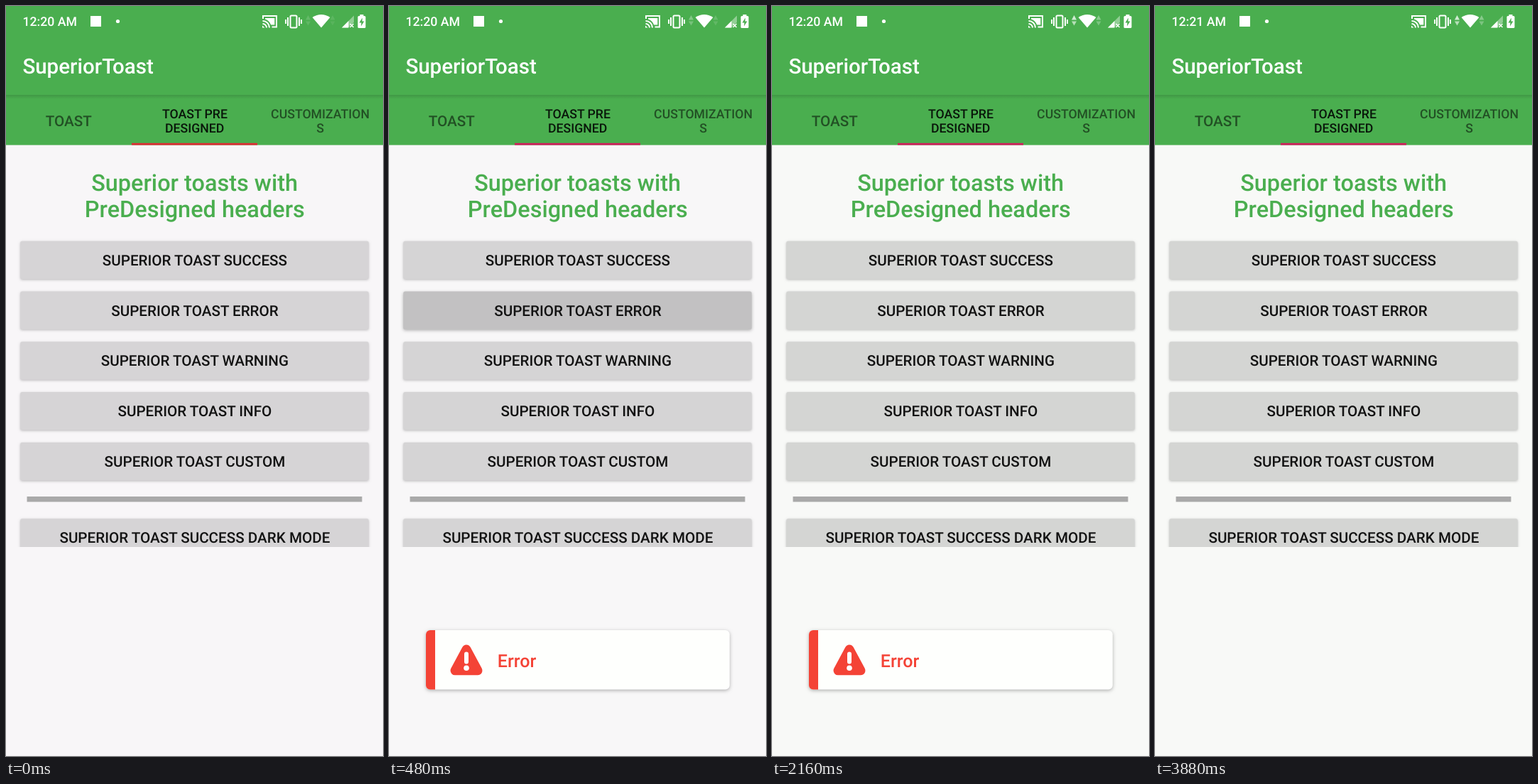
These frames come from a looping animation (531 px wide and 1055 px high, 3.92 s). An HTML page with a canvas:

```html
<!DOCTYPE html>
<html lang="en">
<head>
<meta charset="utf-8">
<title>SuperiorToast</title>
<style>
  html, body { margin: 0; width: 100%; height: 100%; overflow: hidden; background: #f8f9f7; }
  canvas { display: block; width: 531px; height: 1055px; }
</style>
</head>
<body>
<canvas id="stage"></canvas>
<script>
const W = 531, H = 1055, LOOP = 3920;
const GREEN = '#4aae4f', RED = '#f44336', INK = '#121212';
const canvas = document.getElementById('stage');
const ctx = canvas.getContext('2d');
const dpr = window.devicePixelRatio || 1;
canvas.width = Math.round(W * dpr);
canvas.height = Math.round(H * dpr);
ctx.textRendering = 'geometricPrecision';

const ramp = (t, from, to) => Math.min(1, Math.max(0, (t - from) / (to - from)));
const mix = (a, b, k) => a + (b - a) * k;
const blend = (a, b, k) => `rgb(${a.map((v, i) => Math.round(mix(v, b[i], k))).join(',')})`;
const white = a => `rgba(255,255,255,${a})`;
const black = a => `rgba(0,0,0,${a})`;

function scoped(draw) {
  ctx.save();
  draw();
  ctx.restore();
}

function rect(x, y, w, h, color) {
  ctx.fillStyle = color;
  ctx.fillRect(x, y, w, h);
}

function trace(x, y, w, h, r) {
  ctx.beginPath();
  ctx.roundRect(x, y, w, h, r);
}

function poly(points, color) {
  ctx.beginPath();
  points.forEach(([x, y]) => ctx.lineTo(x, y));
  ctx.closePath();
  ctx.fillStyle = color;
  ctx.fill();
}

function dot(x, y, r, color) {
  ctx.beginPath();
  ctx.arc(x, y, r, 0, Math.PI * 2);
  ctx.fillStyle = color;
  ctx.fill();
}

function text(str, x, y, size, color, align = 'center') {
  ctx.font = `500 ${size}px Roboto, sans-serif`;
  ctx.textAlign = align;
  ctx.fillStyle = color;
  ctx.fillText(str, x, y);
}

function shadow(alpha, blur, dy) {
  ctx.shadowColor = black(alpha);
  ctx.shadowBlur = blur * dpr;
  ctx.shadowOffsetY = dy * dpr;
}

function castIcon() {
  ctx.strokeStyle = '#fff';
  ctx.lineWidth = 2;
  ctx.beginPath();
  ctx.moveTo(362, 18);
  ctx.lineTo(362, 14);
  ctx.lineTo(381, 14);
  ctx.lineTo(381, 29.5);
  ctx.lineTo(374.5, 29.5);
  ctx.stroke();
  for (const r of [5.5, 9.5]) {
    ctx.beginPath();
    ctx.arc(361.5, 30.5, r, -Math.PI / 2, 0);
    ctx.stroke();
  }
  poly([[361, 27.5], [364.5, 30.5], [361, 30.5]], '#fff');
  ctx.beginPath();
  ctx.moveTo(365, 17);
  ctx.lineTo(378.3, 17);
  ctx.lineTo(378.3, 26.5);
  ctx.lineTo(373, 26.5);
  ctx.quadraticCurveTo(371, 20.5, 365, 18.5);
  ctx.fill();
}

function vibrateIcon() {
  ctx.strokeStyle = '#fff';
  ctx.lineWidth = 2;
  trace(400.5, 13.5, 9, 17, 1.5);
  ctx.stroke();
  for (const side of [-1, 1]) {
    rect(405 + side * 8 - 1, 16, 2, 12, '#fff');
    rect(405 + side * 11 - 1, 19, 2, 6, '#fff');
  }
}

function arrows(x, a) {
  poly([[x - 3.5, 19.5], [x, 13], [x + 3.5, 19.5]], white(a));
  poly([[x - 3.5, 21.5], [x, 27.5], [x + 3.5, 21.5]], white(a * 0.8));
}

function wifiIcon() {
  ctx.beginPath();
  ctx.moveTo(444, 30.5);
  ctx.lineTo(431.5, 16);
  ctx.quadraticCurveTo(444, 8, 456.5, 16);
  ctx.closePath();
  ctx.fillStyle = '#fff';
  ctx.fill();
}

function signalIcon() {
  poly([[473, 30.5], [490, 13.5], [490, 23], [482, 30.5]], white(0.4));
  poly([[473, 30.5], [482.5, 21], [482.5, 30.5]], '#fff');
  ctx.strokeStyle = '#fff';
  ctx.lineWidth = 1.5;
  ctx.beginPath();
  ctx.moveTo(484.5, 25);
  ctx.lineTo(489.5, 30);
  ctx.moveTo(489.5, 25);
  ctx.lineTo(484.5, 30);
  ctx.stroke();
}

function batteryIcon() {
  rect(498.5, 12, 5, 3, '#fff');
  trace(495.5, 14, 11, 17, 1.5);
  ctx.fillStyle = '#fff';
  ctx.fill();
  poly([[502, 16.5], [497.5, 23.5], [500.5, 23.5], [500, 28.5], [504.5, 21.5], [501.5, 21.5]], GREEN);
}

function statusBar(t, settle) {
  text(t < 2440 ? '12:20 AM' : '12:21 AM', 23.5, 28.4, 17.7, '#fff', 'left');
  rect(119, 14, 15, 15, '#fff');
  dot(157.5, 21.5, 2.6, '#fff');
  castIcon();
  vibrateIcon();
  arrows(425.5, mix(0.15, 0.75, settle));
  wifiIcon();
  arrows(460, mix(0.1, 0.35, settle));
  signalIcon();
  batteryIcon();
}

function header(t, settle) {
  rect(0, 0, W, 195.6, GREEN);
  const edge = ctx.createLinearGradient(0, 125, 0, 131);
  edge.addColorStop(0, black(0.13));
  edge.addColorStop(1, black(0));
  rect(0, 125, W, 6, edge);
  statusBar(t, settle);
  text('SuperiorToast', 23.4, 95.4, 29.5, '#fff', 'left');

  const idle = black(0.54), active = black(0.87);
  text('TOAST', 88.2, 168.8, 20.65, idle);
  text('TOAST PRE', 265.9, 157.5, 17.7, active);
  text('DESIGNED', 265.6, 178.2, 17.7, active);
  text('CUSTOMIZATION', 442.6, 157.5, 17.7, idle);
  text('S', 442.5, 178.2, 17.7, idle);
  rect(177, 192.8, 177, 2.8, blend([222, 44, 52], [208, 30, 92], ramp(t, 200, 480)));
}

function button(label, y, fill, press) {
  const box = [20.2, y, 490.6, 53.4, 2.5];
  scoped(() => {
    shadow(press ? 0.3 : 0.24, press ? 4 : 3.5, press ? 1.4 : 1.1);
    trace(...box);
    ctx.fillStyle = fill;
    ctx.fill();
  });
  if (press) scoped(() => {
    trace(...box);
    ctx.clip();
    dot(406, y + 27, press.radius, black(press.alpha));
  });
  text(label, 265.9, y + 34.1, 20.65, INK);
}

function content(t, settle) {
  text('Superior toasts with', 265.6, 259.6, 32.45, GREEN);
  text('PreDesigned headers', 265.8, 297.4, 32.45, GREEN);

  const fill = blend([214, 212, 214], [212, 213, 211], settle);
  const press = t > 120 && t < 660 && {
    radius: 395 * ramp(t, 120, 360),
    alpha: 0.13 * ramp(t, 120, 200) * (1 - ramp(t, 400, 660))
  };
  ['SUCCESS', 'ERROR', 'WARNING', 'INFO', 'CUSTOM'].forEach((kind, i) =>
    button('SUPERIOR TOAST ' + kind, 330.7 + 70.8 * i, fill, i === 1 && press));

  rect(29.5, 690, 472, 7.5, '#a9a9a9');
  scoped(() => {
    ctx.beginPath();
    ctx.rect(0, 700, W, 61);
    ctx.clip();
    button('SUPERIOR TOAST SUCCESS DARK MODE', 721.2, fill);
  });
}

function errorIcon() {
  ctx.lineJoin = 'round';
  ctx.lineWidth = 13;
  ctx.strokeStyle = RED;
  poly([[109, 905], [125, 934.8], [93, 934.8]], RED);
  ctx.stroke();
  ctx.fillStyle = '#fff';
  trace(106, 908.5, 6, 17, 3);
  ctx.fill();
  dot(109, 931.3, 3.8, '#fff');
}

function toast(alpha) {
  if (alpha <= 0) return;
  scoped(() => {
    ctx.globalAlpha = alpha;
    scoped(() => {
      shadow(0.3, 5, 1.6);
      trace(52, 878, 427.8, 83.5, 6);
      ctx.fillStyle = '#fefffd';
      ctx.fill();
    });
    trace(52, 878, 13, 83.5, [6, 0, 0, 6]);
    ctx.fillStyle = RED;
    ctx.fill();
    errorIcon();
    text('Error', 152.8, 929.8, 25.1, RED, 'left');
  });
}

function draw(t) {
  const settle = ramp(t, 360, 800);
  ctx.setTransform(dpr, 0, 0, dpr, 0, 0);
  rect(0, 0, W, H, blend([248, 246, 248], [248, 249, 247], settle));
  header(t, settle);
  content(t, settle);
  toast(ramp(t, 340, 470) * (1 - ramp(t, 3640, 3840)));
}

function tick() {
  draw(performance.now() % LOOP);
  requestAnimationFrame(tick);
}
tick();
</script>
</body>
</html>
```
